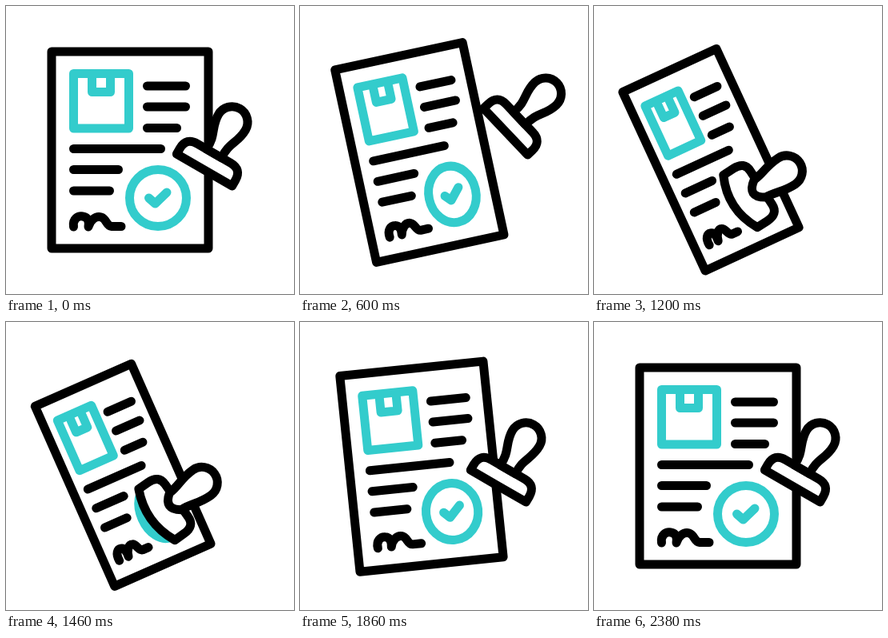
Recreate the animation shown at these times as an HTML page. Size 360 by 360 pixels, loop 2400 ms.

```html
<!DOCTYPE html>
<html lang="en">
<head>
<meta charset="utf-8">
<title>Stamped document</title>
<style>
  html, body { margin: 0; width: 100%; height: 100%; overflow: hidden; background: #fff; }
  svg { display: block; width: 100%; height: 100%; }
  path, rect, circle { vector-effect: non-scaling-stroke; }
  .ink { fill: none; stroke: #000; stroke-width: 11; stroke-linecap: round; stroke-linejoin: round; }
  .teal { stroke: #3cc; }
  .solid { fill: #fff; }
</style>
</head>
<body>
<svg viewBox="0 0 360 360">
  <defs>
    <clipPath id="inside"><rect x="57" y="57" width="196" height="246"/></clipPath>
    <g id="text" class="ink">
      <g class="teal">
        <rect x="84.5" y="84.5" width="69" height="68.5"/>
        <path d="M107.5 85V107.5H130.5V85"/>
      </g>
      <path d="M176.5 100H224.5M176.5 126H224.5M176.5 152.5H213.5M84.5 178.5H193.5M84.5 204.5H140.5M84.5 231H129.5"/>
      <path d="M84.5 276C83 266 90 262 96 263C103 264 104 270 103 276C105 268 112 262 119 264C126 266 125 275 132 275.5H144"/>
    </g>
    <g id="seal" class="ink teal">
      <circle cx="190" cy="240" r="35.5"/>
      <path d="M178.5 240L186.5 247L201 233"/>
    </g>
  </defs>
  <g id="page">
    <rect class="solid" x="57" y="57" width="196" height="246"/>
    <g clip-path="url(#inside)">
      <g id="old"><use href="#text"/><use href="#seal"/></g>
      <g id="fresh"><use href="#text"/><use id="mark" href="#seal"/></g>
    </g>
    <rect class="ink" x="57" y="57" width="196" height="246"/>
  </g>
  <g id="stamp" class="ink">
    <path id="plate" class="solid"/>
    <path id="handle" class="solid"/>
  </g>
</svg>
<script>
const LOOP = 2400, PITCH = 208, STAMPED = 1240;
const el = id => document.getElementById(id);
const [page, old, fresh, mark, stamp, plate, handle] =
  ['page', 'old', 'fresh', 'mark', 'stamp', 'plate', 'handle'].map(el);

const mix = (a, b, k) => a + (b - a) * k;
const span = (t, from, to) => Math.min(1, Math.max(0, (t - from) / (to - from)));
const cubic = x => x < .5 ? 4 * x ** 3 : 1 - 4 * (1 - x) ** 3;

// Ease curve with control points (x1, 0) and (x2, 1)
function bezier(x1, x2) {
  return x => {
    let lo = 0, hi = 1;
    for (let i = 0; i < 24; i++) {
      const m = (lo + hi) / 2, n = 1 - m;
      if (3 * n * n * m * x1 + 3 * n * m * m * x2 + m ** 3 < x) lo = m; else hi = m;
    }
    return lo * lo * (3 - 2 * lo);
  };
}
const tiltIn = bezier(.68, .33), tiltOut = bezier(.76, .17);

function drawPage(t) {
  const p = t < 1200 ? tiltIn(t / 1200) : 1 - tiltOut((t - 1200) / 1200);
  const x = 155 - 14 * p + 5 * p * p, y = 180 + 12.2 * p * p;
  page.setAttribute('transform',
    `translate(${x} ${y}) rotate(${-24.8 * p}) scale(${1 - .342 * p} 1) translate(-155 -180)`);

  const slide = PITCH * cubic(span(t, 649, 1200));
  old.setAttribute('transform', `translate(${slide})`);
  fresh.setAttribute('transform', `translate(${slide - PITCH})`);
  mark.setAttribute('visibility', t >= STAMPED ? 'visible' : 'hidden');
}

// Stamp poses: x, y, angle
const REST = [248, 205, 30], LIFT = [257, 157, 46.5], PRESS = [183, 244, 57];
const blend = (a, b, k) => a.map((v, i) => mix(v, b[i], k));

function drawStamp(t) {
  const up = cubic(span(t, 0, 600)), down = cubic(span(t, 690, 1200)), back = cubic(span(t, 1290, 1910));
  const [x, y, angle] = blend(blend(blend(REST, LIFT, up), PRESS, down), REST, back);
  stamp.setAttribute('transform', `translate(${x} ${y}) rotate(${angle})`);

  const k = down * (1 - back);
  const m = (a, b) => mix(a, b, k);
  const w = m(40, 39), side = m(-8, -15), top = m(-24, -31), flat = m(24, 25);
  plate.setAttribute('d',
    `M${-w} 0V${side}Q${-w} ${top} ${-flat} ${top}H${flat}Q${w} ${top} ${w} ${side}V0Q0 ${m(0, 20)} ${-w} 0Z`);

  const neck = m(11, 13), base = m(-24, -29), pinch = m(9, 14);
  handle.setAttribute('d',
    `M${-neck} ${base}C${-pinch} -45 -19.5 -50 -19.5 -69A19.5 19.5 0 0 1 19.5 -69` +
    `C19.5 -50 ${pinch} -45 ${neck} ${base}Q0 ${m(-24, -9)} ${-neck} ${base}Z`);
}

const start = performance.now();
function frame() {
  const t = (performance.now() - start) % LOOP;
  drawPage(t);
  drawStamp(t);
  requestAnimationFrame(frame);
}
frame();
</script>
</body>
</html>
```
